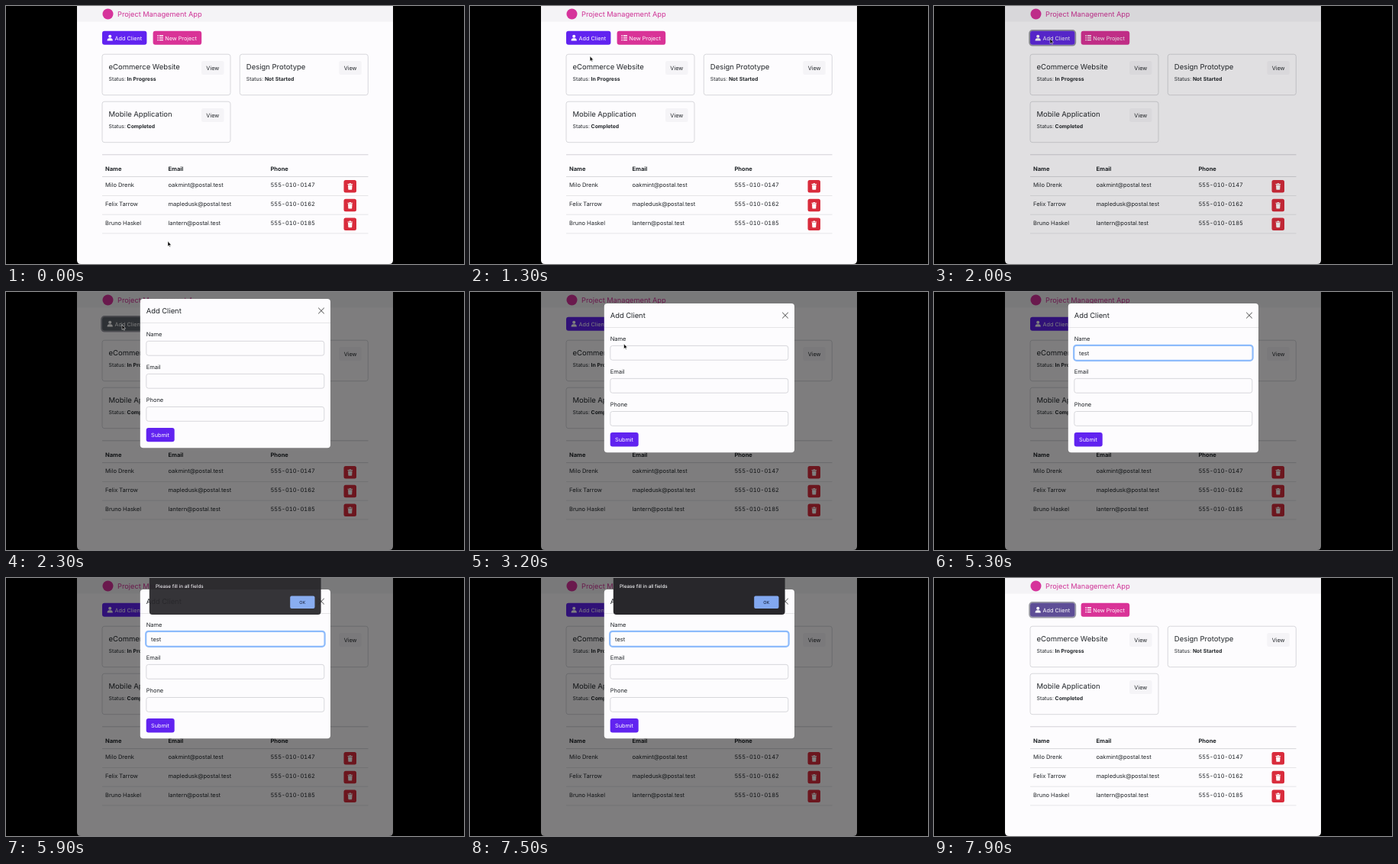
An HTML page that plays this animation: 600x338 px, repeating every 8000 ms.

```html
<!DOCTYPE html>
<html lang="en">
<head>
<meta charset="utf-8">
<title>Project Management App</title>
<style>
  html, body { margin: 0; width: 100%; height: 100%; overflow: hidden; background: #000; }
  svg { display: block; width: 100vw; height: 100vh; }
  text { font: 7.5px Inter, Roboto, sans-serif; fill: #212529; white-space: pre; font-variant-numeric: tabular-nums; text-rendering: geometricPrecision; }
  .btn { font-size: 7.25px; fill: #fff; }
  .h { font-size: 9.5px; }
  .s { font-size: 6.85px; }
  .b { font-weight: 700; }
  .line { stroke: #dcdbdf; stroke-width: .7; }
  .box { fill: #fdfcfe; stroke: #cfced4; stroke-width: .8; }
</style>
</head>
<body>
<svg id="stage" viewBox="0 0 600 338"></svg>
<script>
const PURPLE = [97, 35, 240], GREY = [92, 99, 106];
const text = (x, y, s, cls = '', extra = '') => `<text x="${x}" y="${y}" class="${cls}" ${extra}>${s}</text>`;
const rect = (x, y, w, h, r, extra) => `<rect x="${x}" y="${y}" width="${w}" height="${h}" rx="${r}" ${extra}/>`;
const line = (x1, x2, y, extra = '') => `<path class="line" d="M${x1} ${y}H${x2}" ${extra}/>`;

const card = (x, y, title, status) =>
  rect(x, y, 168, 53.5, 3, 'class="box"') +
  text(x + 8.5, y + 19.5, title, 'h') +
  text(x + 8.5, y + 34.3, `Status: <tspan class="b">${status}</tspan>`, 's') +
  rect(x + 130, y + 8.8, 29.5, 18, 2.5, 'fill="#f5f4f7"') +
  text(x + 144.8, y + 20.4, 'View', '', 'text-anchor="middle" style="font-size:7.3px"');

const trash = y =>
  rect(442.5, y, 16.5, 16.5, 2.5, 'fill="#d92c3c"') +
  `<path d="M447.5 ${y + 5}h6.6v1.1h-6.6zM449.6 ${y + 4.2}h2.4v1h-2.4zM448 ${y + 6.6}h5.6l-.4 5.6q0 .6-.7.6h-3.4q-.7 0-.7-.6z" fill="#fff"/>`;

const row = (y, name, email, phone) =>
  text(130, y, name) + text(212.5, y, email) + text(346.5, y, phone) +
  trash(y - 9.2) + line(126, 474.5, y + 11.3);

const field = (y, label) => text(183.7, y, label) + rect(183.8, y + 6.6, 233, 18.8, 2.8, 'class="box"');

const page =
  '<path d="M93 0H507V333q0 5-5 5H98q-5 0-5-5z" fill="#fdfcfe"/>' +
  rect(93, 0, 414, 20.5, 0, 'fill="#f4f3f6"') +
  '<circle cx="133.5" cy="10.5" r="7" fill="#d6339b"/>' +
  text(146, 14.3, 'Project Management App', '', 'style="font-size:9.25px;fill:#cf3296"') +
  rect(125.2, 32, 60, 19.6, 3.8, 'id="ring" fill="none" stroke="#9a9aa4" stroke-width="2"') +
  rect(126, 32.8, 58.4, 18, 3, 'id="add"') +
  '<g fill="#fff"><circle cx="136.2" cy="39.7" r="2"/><path d="M132.6 45.6q0-3.3 2.6-3.3h2q2.6 0 2.6 3.3z"/></g>' +
  text(142.6, 44.6, 'Add Client', 'btn') +
  rect(192.6, 32.8, 63.6, 18, 3, 'fill="#d93397"') +
  [39, 41.8, 44.6].map(y => `<path d="M198.3 ${y}h1.5M200.8 ${y}h5.2" stroke="#fff" stroke-width="1.3"/>`).join('') +
  text(208.3, 44.6, 'New Project', 'btn') +
  card(126, 63.2, 'eCommerce Website', 'In Progress') +
  card(306.3, 63.2, 'Design Prototype', 'Not Started') +
  card(126, 125.2, 'Mobile Application', 'Completed') +
  line(126, 474.5, 194.8, 'style="stroke:#bfbec4"') +
  text(130, 216.2, 'Name', 'b') + text(212.5, 216.2, 'Email', 'b') + text(346.5, 216.2, 'Phone', 'b') +
  line(126, 474.5, 223.6, 'style="stroke:#c8c7cc"') +
  row(237.2, 'Milo Drenk', 'oakmint@postal.test', '555-010-0147') +
  row(261.9, 'Felix Tarrow', 'mapledusk@postal.test', '555-010-0162') +
  row(286.6, 'Bruno Haskel', 'lantern@postal.test', '555-010-0185');

const modal =
  rect(175.8, 15, 249.2, 195.3, 4, 'fill="#fdfcfe"') +
  text(183.8, 34.2, 'Add Client', '', 'style="font-size:9.4px"') +
  '<path d="M409.2 26.8l7.6 7.6m0-7.6l-7.6 7.6" stroke="#444" stroke-width="1"/>' +
  line(176, 425, 46.5) +
  field(63.8, 'Name') + field(106.8, 'Email') + field(149.9, 'Phone') +
  rect(183.2, 69.8, 234.4, 20, 3.6, 'id="focus" fill="#fdfcfe" stroke="#8dbbfb" stroke-width="2.2"') +
  text(190, 83, '', '', 'id="typed"') +
  '<path id="caret" d="M0 75.3v9.6" stroke="#222" stroke-width=".8"/>' +
  rect(183.7, 184, 37, 18.4, 3, 'fill="#6123f0"') +
  text(190, 195.9, 'Submit', 'btn');

const popup =
  '<path d="M238.5 95l5-5 5 5z" fill="#1c1c1e"/>' +
  rect(233.4, 94.5, 113.8, 84.5, 2, 'fill="#2b2a2e"') +
  '<circle cx="243" cy="168.7" r="2.6" fill="#ddd"/>' +
  text(253, 170.6, 'Manage…', '', 'style="font-size:6.6px;fill:#ddd"') +
  rect(232.3, 94.4, 130, 74.8, 0, 'fill="#000"');

const dialog =
  '<path d="M187.8 0H412.6V44q0 4-4 4H191.8q-4 0-4-4z" fill="#28272b"/>' +
  text(196, 12.9, 'Please fill in all fields', '', 'style="font-size:6.3px;font-weight:500;fill:#f2f2f4"') +
  rect(372.2, 23.6, 32.3, 16.4, 2, 'fill="#82a8f0"') +
  text(388.3, 33.7, 'OK', '', 'text-anchor="middle" style="font-size:5.6px;font-weight:500;fill:#1d2b4c"');

const cursor =
  '<path id="arrow" d="M0 0V6.6L1.5 5.2 2.5 7.4 3.4 7 2.5 4.9H4.5Z" fill="#000" stroke="#fff" stroke-width=".5"/>' +
  '<path id="beam" d="M-1.5 -3.8q1.5 0 1.5 1v5.6q0 1-1.5 1M1.5 -3.8q-1.5 0-1.5 1M1.5 3.8q-1.5 0-1.5-1" fill="none" stroke="#222" stroke-width=".8"/>';

document.getElementById('stage').innerHTML = page +
  rect(93, 0, 414, 338, 0, 'id="shade" fill="#000"') +
  `<g id="modal">${modal}</g><g id="popup">${popup}</g><g id="dialog">${dialog}</g><g id="cursor">${cursor}</g>`;

const $ = id => document.getElementById(id);
const ramp = (t, a, b) => Math.min(1, Math.max(0, (t - a) / (b - a)));
const smooth = p => p * p * (3 - 2 * p);
const within = (t, a, b) => t >= a && t < b;
const show = (id, on) => $(id).setAttribute('opacity', +on);
const move = (id, x, y) => $(id).setAttribute('transform', `translate(${x} ${y})`);

function draw(t) {
  // Button focus: shown on click and when the form closes
  const grey = ramp(t, 1980, 2180) - ramp(t, 2450, 2600) + ramp(t, 7820, 7940);
  $('add').setAttribute('fill', `rgb(${PURPLE.map((c, i) => Math.round(c + (GREY[i] - c) * grey))})`);
  show('ring', within(t, 1900, 2450) || t >= 7820);

  show('shade', (ramp(t, 1963, 2130) - ramp(t, 7720, 7860)) * .5);
  const open = 1 - (1 - ramp(t, 2150, 2450)) ** 2;
  const close = ramp(t, 7560, 7800);
  move('modal', 0, -24.5 * (1 - open + close * close));
  show('modal', ramp(t, 2150, 2290) - ramp(t, 7560, 7720));

  // Name field
  const chars = Math.floor(ramp(t, 4350, 4950) * 4);
  $('typed').textContent = 'test'.slice(0, chars);
  show('focus', within(t, 3600, 7700));
  show('caret', within(t, 3600, 5800) && (t - 3600) % 1000 < 700);
  move('caret', 190.4 + (chars ? $('typed').getComputedTextLength() + .4 : 0), 0);
  show('popup', within(t, 3700, 4500));
  show('dialog', within(t, 5800, 7550) ? .6 + .4 * ramp(t, 5800, 5920) : 0);

  const a = smooth(ramp(t, 400, 1500)), b = smooth(ramp(t, 2700, 3500));
  const x = 212 - 60 * a + 72.4 * b, y = 308.3 - 265.5 * a + 36.6 * b;
  const typing = within(x, 184, 417) && within(y, 70, 90);
  move('cursor', x, y);
  show('cursor', t < 4500);
  show('arrow', !typing);
  show('beam', typing);
}

function tick() {
  draw(performance.now() % 8000);
  requestAnimationFrame(tick);
}
tick();
</script>
</body>
</html>
```
